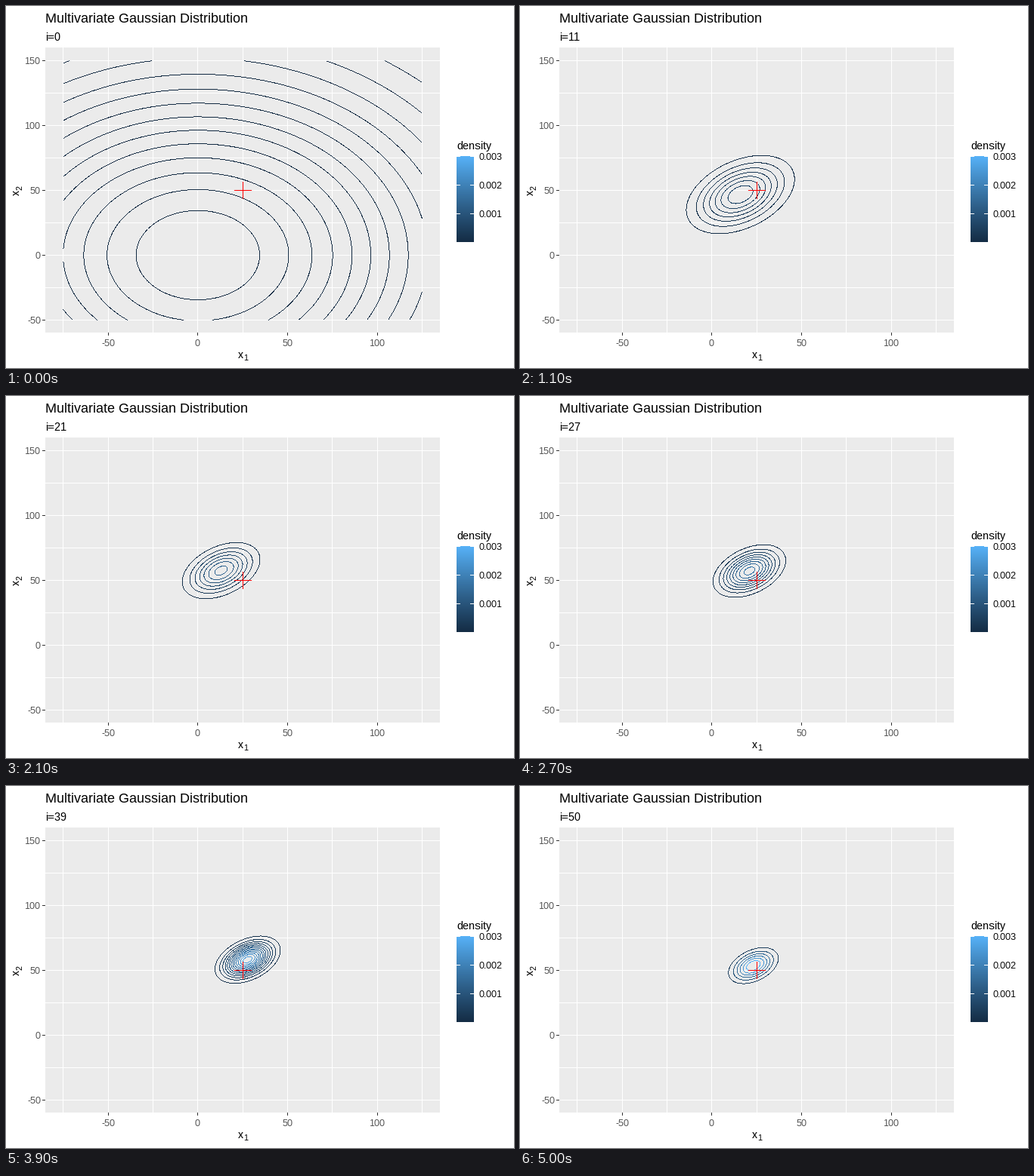
A matplotlib script for the animation above (5.1 s loop, 672x480 px).

```python
import numpy as np
import matplotlib
import matplotlib.pyplot as plt
from matplotlib.animation import FuncAnimation
from matplotlib.patches import Rectangle

matplotlib.rcParams.update({
    "font.family": "Liberation Sans",
    "text.hinting": "native",
    "text.hinting_factor": 1,
})

W, H, DPI = 672, 480, 96
FRAMES, STEP_MS = 51, 100

# data units to pixels
X0, Y0, KX, KY = 253.8, 330.4, 2.3727, 1.718
LEFT, TOP, RIGHT, BOTTOM = 52, 55, 574, 433

PRIOR_VAR = 100.0 ** 2
NOISE_VAR = np.array([3500.0, 1500.0])  # along the two diagonals
AXES = np.array([[1, 1], [1, -1]]) / np.sqrt(2)
ANGLE = np.linspace(0, 2 * np.pi, 16000)
CIRCLE = np.array([np.cos(ANGLE), np.sin(ANGLE)])
TOP_DENSITY = 0.003

# turning points of the running sample average
TURNS = [4, 6, 11, 18, 21, 32, 39, 42, 50]
AVG_X1 = [23.8, 12.9, 16.7, 21.1, 13.4, 27.9, 28.1, 25.3, 23.4]
AVG_X2 = [45.3, 37.8, 48.0, 58.4, 58.3, 57.5, 58.7, 57.5, 54.0]


def px(x, y):
    return X0 + KX * x, Y0 - KY * y


# colour scale, blended in Lab

TO_XYZ = np.array([[0.4124, 0.3576, 0.1805],
                   [0.2126, 0.7152, 0.0722],
                   [0.0193, 0.1192, 0.9505]])
WHITE = TO_XYZ.sum(axis=1)


def to_lab(rgb):
    rgb = np.array(rgb) / 255
    lin = np.where(rgb > 0.04045, ((rgb + 0.055) / 1.055) ** 2.4, rgb / 12.92)
    t = TO_XYZ @ lin / WHITE
    f = np.where(t > 0.008856, np.cbrt(t), 7.787 * t + 16 / 116)
    return np.array([116 * f[1] - 16, 500 * (f[0] - f[1]), 200 * (f[1] - f[2])])


def to_rgb(lab):
    fy = (lab[0] + 16) / 116
    f = np.array([fy + lab[1] / 500, fy, fy - lab[2] / 200])
    xyz = WHITE * np.where(f > 0.2069, f ** 3, (f - 16 / 116) / 7.787)
    lin = np.clip(np.linalg.solve(TO_XYZ, xyz), 0, 1)
    return np.where(lin > 0.0031308, 1.055 * lin ** (1 / 2.4) - 0.055, 12.92 * lin)


DARK, LIGHT = to_lab((19, 43, 67)), to_lab((86, 177, 247))


def shade(density):
    t = np.clip(density / TOP_DENSITY, 0, 1)
    return to_rgb(DARK + t * (LIGHT - DARK))


# posterior and its contours

def posterior(i):
    """Mean and the variances along AXES after i samples."""
    var = 1 / (1 / PRIOR_VAR + i / NOISE_VAR)
    average = np.array([np.interp(i, TURNS, AVG_X1), np.interp(i, TURNS, AVG_X2)])
    shrink = i * var / NOISE_VAR
    return AXES @ (shrink * (AXES @ average)), var


def level_step(span):
    """Round step giving about ten levels."""
    cell = span / 10
    base = step = 10.0 ** np.floor(np.log10(cell))
    for factor, bias in ((2, 1.5), (5, 2.75), (10, 1.5)):
        if factor * base - cell >= bias * (cell - step):
            break
        step = factor * base
    return step


def stroke(canvas, x, y, color):
    """One-pixel hard-edged curve, clipped to the sampled area."""
    inside = (x >= -75) & (x <= 125) & (y >= -50) & (y <= 150)
    u, v = px(x, y)
    flat = np.abs(np.gradient(u)) >= np.abs(np.gradient(v))
    centred = np.abs(np.where(flat, u, v) % 1 - 0.5) < 0.1
    keep = inside & centred
    canvas[v[keep].astype(int), u[keep].astype(int)] = (*color, 1)


def contours(i):
    canvas = np.zeros((H, W, 4))
    mean, var = posterior(i)
    peak = 1 / (2 * np.pi * np.sqrt(var.prod()))
    corner = AXES @ (np.array([125, 150]) - mean)
    low = peak * np.exp(-0.5 * (corner ** 2 / var).sum())
    step = level_step(peak - low)
    for level in step * np.arange(1, int(peak / step) + 1):
        if level > low:
            radii = np.sqrt(2 * var * np.log(peak / level))
            x, y = mean[:, None] + AXES @ (radii[:, None] * CIRCLE)
            stroke(canvas, x, y, shade(level))
    return canvas


# static scene

fig = plt.figure(figsize=(W / DPI, H / DPI), dpi=DPI, facecolor="white")
ax = fig.add_axes([0, 0, 1, 1])
ax.axis("off")


def rect(x, y, w, h, color, z=1):
    ax.add_patch(Rectangle((x, y), w, h, fc=color, ec="none", lw=0,
                           antialiased=False, zorder=z))


def label(x, y, text, size, color="black", ha="left", rotation=0):
    return ax.text(x, y, text, fontsize=size * 72 / DPI, color=color, ha=ha,
                   va="baseline", rotation=rotation, rotation_mode="anchor")


rect(LEFT, TOP, RIGHT - LEFT, BOTTOM - TOP, "#EBEBEB", 0)

for value in range(-75, 151, 25):
    gx, gy = (int(p) for p in px(value, value))
    major = value % 50 == 0
    if value <= 125:
        rect(gx, TOP, 1, BOTTOM - TOP, "white")
        if major:
            rect(gx, BOTTOM, 1, 4, "#333333")
            label(gx + 0.5, 451, str(value), 12, "#4D4D4D", "center")
    if value >= -50:
        rect(LEFT, gy, RIGHT - LEFT, 1, "white")
        if major:
            rect(LEFT - 4, gy, 4, 1, "#333333")
            label(46, gy + 5, str(value), 12, "#4D4D4D", "right")

label(52, 22, "Multivariate Gaussian Distribution", 18)
counter = label(52, 46, "", 15)
label(306.4, 467, "x", 15)
label(314, 470, "1", 10.5)
label(18, 251, "x", 15, rotation=90)
label(21, 243.5, "2", 10.5, rotation=90)

label(596, 190, "density", 15)
BAR_X, BAR_Y, BAR_W, BAR_H = 596, 199, 23, 114
for row in range(BAR_H):
    rect(BAR_X, BAR_Y + row, BAR_W, 1, shade(TOP_DENSITY * (1 - row / BAR_H)))
for k in (1, 2, 3):
    ty = BAR_Y + BAR_H * (3 - k) // 3
    for tx in (BAR_X, BAR_X + BAR_W - 5):
        rect(tx, ty, 5, 1, "white", 2)
    label(626, ty + 5, f"0.00{k}", 12)

rings = ax.imshow(np.zeros((H, W, 4)), extent=(0, W, H, 0), aspect="auto",
                  interpolation="nearest", zorder=3)
ax.set_xlim(0, W)
ax.set_ylim(H, 0)

cx, cy = (int(p) for p in px(25, 50))
rect(cx - 11, cy, 23, 1, "red", 4)
rect(cx, cy - 11, 1, 23, "red", 4)


def draw(i):
    rings.set_data(contours(i))
    counter.set_text(f"i={i}")
    return rings, counter


anim = FuncAnimation(fig, draw, frames=FRAMES, interval=STEP_MS,
                     repeat=True, repeat_delay=0, blit=False)
plt.show()
```
